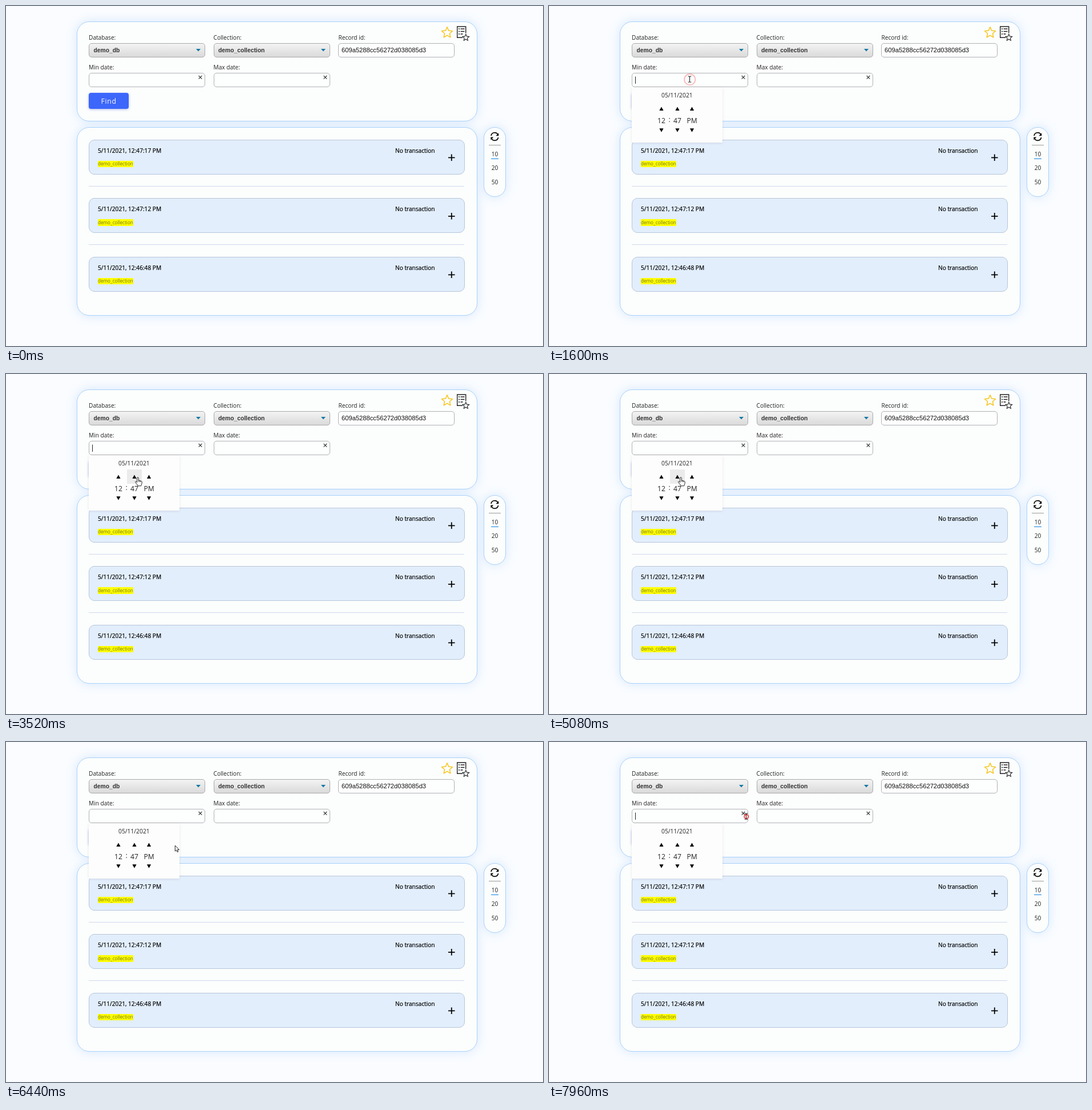
Recreate the animation shown at these times as an HTML page. Size 941x595 px, loop 8000 ms.

```html
<!DOCTYPE html>
<html lang="en">
<head>
<meta charset="utf-8">
<title>Record search</title>
<style>
  html, body { margin: 0; width: 100%; height: 100%; overflow: hidden; background: #fafcff; }
  #stage { position: relative; width: 941px; height: 595px; overflow: hidden; background: #fafcff; }
  .box { position: absolute; box-sizing: border-box; }
  .panel { background: #fcfdfd; border: 1px solid #aad2fa; border-radius: 22px; box-shadow: 0 0 17px rgba(165, 205, 250, .42); }
  .pill { border-radius: 19px; }
  .item { background: #e2eefc; border: 1px solid #b5c6da; border-radius: 10px; }
  .field { background: #fdfefe; border: 1px solid #b0b2b4; border-radius: 5px; }
  .select { background: linear-gradient(#f3f3f3, #dadada); border-color: #aaa; }
  .find { background: #3d66fb; border-radius: 4px; box-shadow: 0 1px 4px rgba(60, 90, 200, .4); }
  .rule { background: #d0daea; }
  .mark { background: #ff0; }
  svg { position: absolute; left: 0; top: 0; }
  text { font-family: "Open Sans", "Noto Sans", sans-serif; font-size: 10.15px; fill: #222; white-space: pre; }
  .strong { fill: #000; stroke: #000; stroke-width: .22px; }
  .arial { font-family: "Liberation Sans", Arial, sans-serif; }
  .bold { font-weight: bold; fill: #333; }
</style>
</head>
<body>
<div id="stage"></div>
<script>
const stage = document.getElementById('stage');
const NS = 'http://www.w3.org/2000/svg';

function box(cls, x, y, w, h) {
  const el = document.createElement('div');
  el.className = 'box ' + cls;
  el.style.cssText = `left:${x}px;top:${y}px;width:${w}px;height:${h}px`;
  stage.append(el);
}

function layer() {
  const svg = node(stage, 'svg', { width: 941, height: 595 });
  return svg;
}

function node(parent, tag, attrs) {
  const el = document.createElementNS(NS, tag);
  for (const key in attrs) el.setAttribute(key, attrs[key]);
  parent.append(el);
  return el;
}

function label(parent, str, x, y, attrs = {}) {
  node(parent, 'text', { x, y, ...attrs }).textContent = str;
}

function line(parent, d, color, width = 1, attrs = {}) {
  return node(parent, 'path', { d, fill: 'none', stroke: color, 'stroke-width': width, ...attrs });
}

function fill(parent, d, color) {
  return node(parent, 'path', { d, fill: color });
}

function star(cx, cy, r) {
  const pts = Array.from({ length: 10 }, (_, i) => {
    const a = Math.PI * (i / 5 - .5), q = i % 2 ? r * .46 : r;
    return (cx + q * Math.cos(a)).toFixed(2) + ' ' + (cy + q * Math.sin(a)).toFixed(2);
  });
  return 'M' + pts.join('L') + 'Z';
}

// Panels and controls
const items = [
  [233.5, '5/11/2021, 12:47:17 PM'],
  [336, '5/11/2021, 12:47:12 PM'],
  [438.5, '5/11/2021, 12:46:48 PM']
];
box('panel', 123.5, 26.5, 702, 175);
box('panel', 123.5, 211.5, 702, 330);
box('panel pill', 837, 211.5, 39, 122);
box('field select', 144.5, 65, 204, 25);
box('field select', 363.5, 65, 204, 25);
box('field', 582, 65, 204, 25);
box('field', 144.5, 117, 204, 25);
box('field', 363.5, 117, 204, 25);
box('find', 145, 152, 70, 28);
box('rule', 145, 315, 658, 1);
box('rule', 145, 417, 658, 1);
for (const [y] of items) {
  box('item', 144.5, y, 659.5, 61);
  box('mark', 161, y + 37, 62, 11.5);
}

const page = layer();
label(page, 'Database:', 145, 58.5);
label(page, 'Collection:', 363.5, 58.5);
label(page, 'Record id:', 582.5, 58.5);
label(page, 'Min date:', 145, 110.5);
label(page, 'Max date:', 363.5, 110.5);
label(page, 'demo_db', 153.5, 80.5, { class: 'arial bold', style: 'font-size:10.3px' });
label(page, 'demo_collection', 372, 80.5, { class: 'arial bold', style: 'font-size:10.3px' });
label(page, '609a5288cc56272d038085d3', 588, 80.8, { class: 'arial', style: 'font-size:11.2px;fill:#111' });
label(page, 'Find', 166.5, 171, { style: 'font-size:12.2px;letter-spacing:.7px;fill:#fff' });
for (const x of [337, 556]) fill(page, `M${x - 4} 75h8l-4 4.5z`, '#1478a6');
for (const x of [340.5, 559.5]) line(page, `M${x - 2.8} 122l5.6 5.6m0 -5.6l-5.6 5.6`, '#333', 1.1);

for (const [y, date] of items) {
  label(page, date, 161, y + 23.3, { class: 'strong' });
  label(page, 'No transaction', 682, y + 23.3, { class: 'strong' });
  label(page, 'demo_collection', 161, y + 45.6, { style: 'font-size:8.15px;fill:#72701c' });
  line(page, `M775 ${y + 31.8}h11.5M780.75 ${y + 26}v11.6`, '#000', 1.8);
}

// Favourite, list and refresh icons
line(page, star(773, 46.8, 10), '#f8c51c', 1.5, { 'stroke-linejoin': 'round' });
line(page, 'M800 55.3h-9.3v-19.3h15v11.5', '#222', 1.4);
line(page, 'M793 40h2m1.5 0h7M793 44.5h2m1.5 0h7M793 49h2m1.5 0h4', '#222', 1.6);
node(page, 'path', { d: star(805.8, 55.4, 6), fill: '#fff', stroke: '#222', 'stroke-width': 1.1 });
line(page, 'M850 227a6.4 6.4 0 0 1 11.6 -2.6M862.6 230a6.4 6.4 0 0 1 -11.8 2.2', '#000', 1.6);
fill(page, 'M863.2 222.3v5h-4.8zM849.4 234.4v-5h4.8z', '#000');
line(page, 'M846 243.5h21', '#999');
line(page, 'M850 267.3h13', '#55a8ea', 1.6);
['10', '20', '50'].forEach((n, i) => label(page, n, 850.7, 263 + i * 24.3));

// Date picker
const HOVER = [[212, 238], [238, 263]];
const picker = node(page, 'g', { style: 'filter:drop-shadow(0 1px 2px rgba(0,0,0,.09))' });
node(picker, 'rect', { x: 145, y: 142, width: 159, height: 97, fill: '#fdfdfd' });
const hovers = HOVER.map(([a, b]) =>
  node(picker, 'rect', { x: a, y: 167, width: b - a, height: 25, fill: '#ebebeb' }));
label(picker, '05/11/2021', 197, 159.7, { style: 'font-size:10.3px' });
const big = { style: 'font-size:12.1px' };
label(picker, '12', 190, 205, big);
label(picker, ':', 209.5, 203, big);
label(picker, '47', 218, 205, big);
label(picker, 'PM', 241.5, 205, big);
for (const x of [197, 225, 250.5])
  fill(picker, `M${x - 3.6} 183h7.2l-3.6 -6.4zM${x - 3.6} 214.3h7.2l-3.6 6.4z`, '#000');

const caret = line(page, 'M151.5 123.5v12.5', '#222');
const ring = node(page, 'circle', { fill: 'none', stroke: '#f03c3c', 'stroke-width': 2 });

// Pointers, each with its hot spot at 0,0
const pointer = node(page, 'g', {});
const shape = {};
for (const kind of ['arrow', 'hand', 'beam']) shape[kind] = node(pointer, 'g', {});
const ink = { fill: '#fff', stroke: '#222', 'stroke-width': 1, 'stroke-linejoin': 'round' };
node(shape.arrow, 'path', { d: 'M.3 .3v10l2.3 -2 1.6 3.6 1.6 -.7 -1.5 -3.5h3.1z', ...ink });
node(shape.hand, 'path', {
  d: 'M-1.3 1.2q0 -1.3 1.3 -1.3t1.3 1.3v4l1.9 .3 1.8 .6 1.7 .8q.7 .4 .6 1.6l-.5 3 -1.2 3.3h-5.4l-2 -3.2 -2.6 -3.2q-.4 -1.3 1 -1.5l2.1 1.6z', ...ink
});
line(shape.hand, 'M1.3 5v2.8M3.3 5.7v2.4M5.1 6.4v2', '#222', .8);
line(shape.beam, 'M-2.8 -5q2.3 -.2 2.8 .8q.5 -1 2.8 -.8M0 -4.2v8.6M-2.8 5.2q2.3 .2 2.8 -.8q.5 1 2.8 .8', '#222', 1.1);

// Motion: time, x, y of the pointer
const PATH = [
  [40, 150, 545], [840, 235, 152], [1120, 246.5, 128], [1720, 246.5, 128],
  [2560, 243, 178], [2960, 243, 178], [3000, 248, 183], [3240, 248, 183],
  [3360, 243, 187], [3520, 231, 181], [5120, 231, 181], [5640, 234, 175],
  [5840, 235, 176], [5960, 235, 176], [6720, 323, 183], [7040, 323, 183],
  [7800, 345.5, 130], [8000, 345.5, 130]
];
const CLICKS = [1360, 6800, 7920];
const LOOP = 8000, STEP = 40, BLINK = 520;

function place(t) {
  const i = Math.max(1, PATH.findIndex(p => p[0] >= t));
  const [t0, x0, y0] = PATH[i - 1], [t1, x1, y1] = PATH[i];
  const u = Math.min(1, Math.max(0, (t - t0) / (t1 - t0)));
  const e = i === 1 ? 1 - (1 - u) ** 2 : u * u * (3 - 2 * u);
  return [x0 + (x1 - x0) * e, y0 + (y1 - y0) * e];
}

function show(el, on) {
  el.style.display = on ? '' : 'none';
}

function draw(t) {
  const [x, y] = place(t);
  const open = t >= CLICKS[0] && t < CLICKS[1] || t >= CLICKS[2];
  const since = t >= CLICKS[2] ? 0 : Math.max(0, t - 1440);
  show(picker, open);
  show(caret, open && Math.floor(since / BLINK) % 2 === 0);

  let kind = x > 145 && x < 348 && y >= 117 && y < 142 ? 'beam' : 'arrow';
  HOVER.forEach(([a, b], i) => {
    const over = open && x >= a && x < b && y >= 167 && y < 192;
    show(hovers[i], over);
    if (over) kind = 'hand';
  });
  show(pointer, t >= 40);
  for (const k in shape) show(shape[k], k === kind);
  pointer.setAttribute('transform', `translate(${x.toFixed(1)} ${y.toFixed(1)})`);

  const click = CLICKS.filter(c => c <= t).pop();
  const age = t - click;
  show(ring, age < 360);
  if (age < 360) {
    const [cx, cy] = place(click);
    ring.setAttribute('cx', cx + .3);
    ring.setAttribute('cy', cy + .6);
    ring.setAttribute('r', 2.4 + age * .03);
    ring.setAttribute('opacity', 1 - age / 360);
  }
}

const start = performance.now();
function tick() {
  const t = (performance.now() - start) % LOOP;
  draw(Math.floor(t / STEP) * STEP);
  requestAnimationFrame(tick);
}
tick();
</script>
</body>
</html>
```
